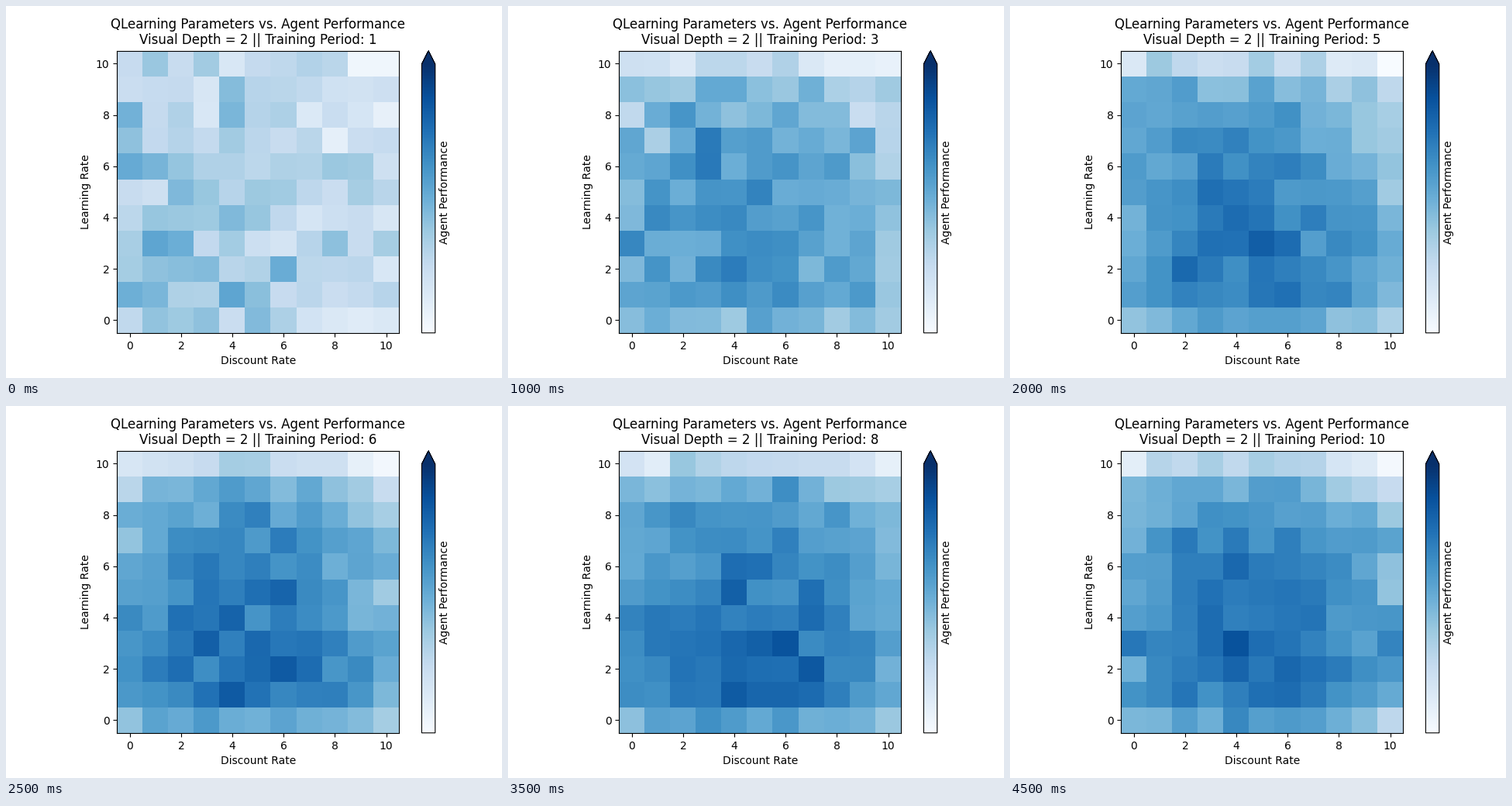
Write a matplotlib script that moves like this. It is 640 px wide and 480 px high and loops after 5000 ms.

```python
import numpy as np
import matplotlib.pyplot as plt
from matplotlib.animation import FuncAnimation
from matplotlib.cm import ScalarMappable
from matplotlib.colors import Normalize

W, H = 640, 480
PERIODS = 10
N = 11
SIDE = 364
BOTTOM = 58.2


def performance(period):
    """Grid of agent performance, learning rate by discount rate."""
    lr, disc = np.mgrid[0:N, 0:N]
    first = .38 - .0017 * disc ** 2 - .1 * np.exp(lr - 10)
    # Trained agents do best at low, non-zero rates and mid discounts.
    trained = (.75 - .02 * lr - .25 * np.exp(-2 * lr) - .33 * np.exp(lr - 10)
               + .08 - .0075 * (disc - 4.4) ** 2)
    skill = 1 - np.exp(-.55 * (period - 1))
    noise = np.random.default_rng(40 + period).normal(size=(N, N))
    grid = first + skill * (trained - first) + (.095 - .045 * skill) * noise
    return np.clip(grid, 0, 1)


def box(x, y, w, h):
    return [x / W, y / H, w / W, h / H]


plt.rcParams["font.family"] = "DejaVu Sans"
fig = plt.figure(figsize=(W / 100, H / 100), dpi=100, facecolor="white")

ax = fig.add_axes(box(143.2, BOTTOM, SIDE, SIDE))
image = ax.imshow(performance(1), cmap="Blues", vmin=0, vmax=1,
                  origin="lower", interpolation="nearest", aspect="auto")
ax.set_xticks(range(0, N, 2))
ax.set_yticks(range(0, N, 2))
ax.set_xlabel("Discount Rate")
ax.set_ylabel("Learning Rate")
title = ax.set_title("", fontsize=12)

cax = fig.add_axes(box(536.4, BOTTOM, 17.4, SIDE))
bar = fig.colorbar(ScalarMappable(Normalize(0, 1), "Blues"), cax=cax,
                   extend="max", ticks=[])
bar.minorticks_off()
fig.text(559.4 / W, (BOTTOM + SIDE / 2) / H, "Agent Performance",
         rotation=90, ha="left", va="center", fontsize=10)


def draw(i):
    period = i % PERIODS + 1
    image.set_data(performance(period))
    title.set_text("QLearning Parameters vs. Agent Performance\n"
                   f"Visual Depth = 2 || Training Period: {period}")
    return image, title


anim = FuncAnimation(fig, draw, frames=PERIODS, interval=500, repeat=True,
                     repeat_delay=0, init_func=lambda: draw(0), blit=False)
plt.show()
```
